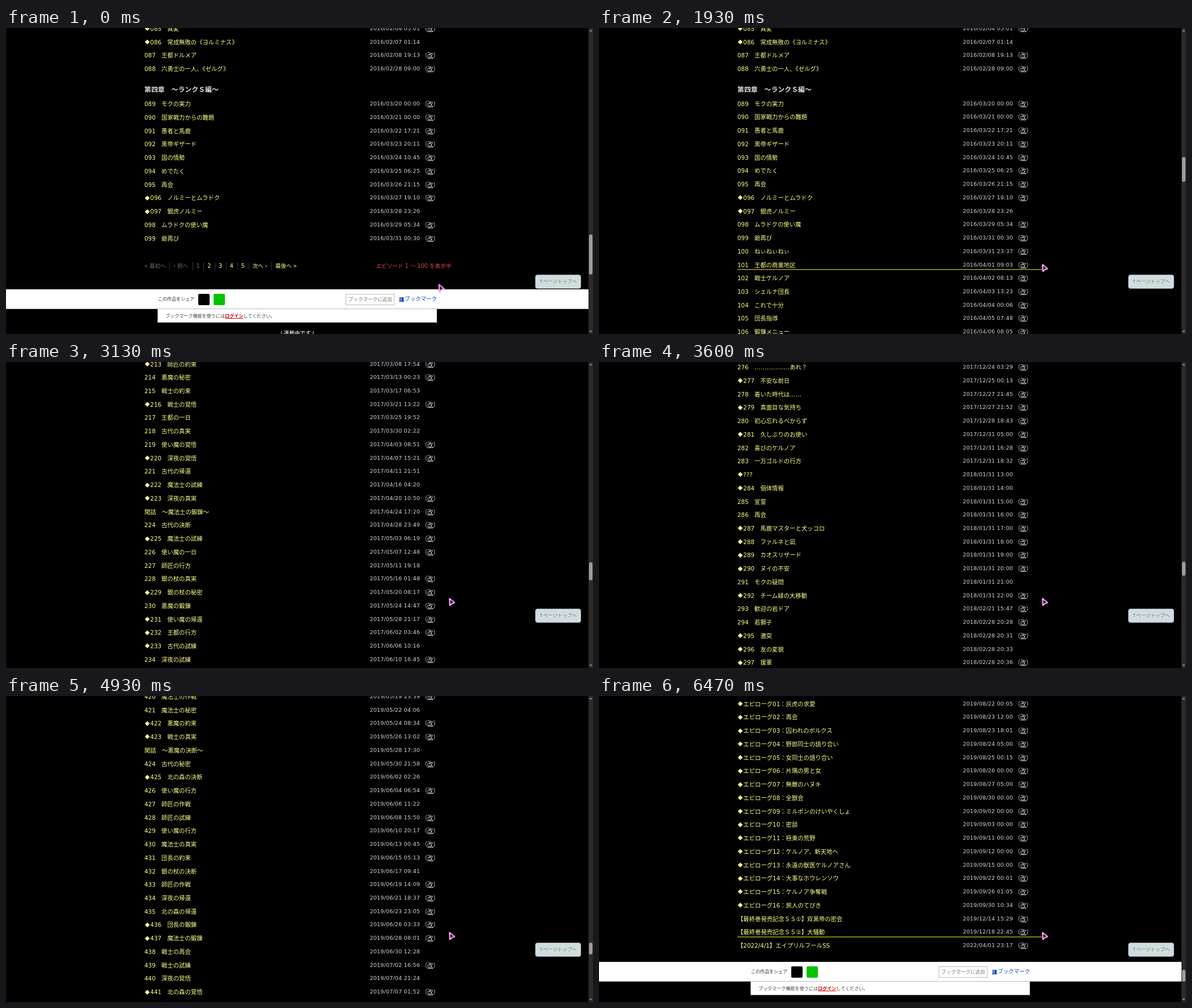
An HTML page for the animation above (7.27 s loop, 1035x541 px).

```html
<!DOCTYPE html>
<html lang="ja">
<head>
<meta charset="utf-8">
<title>Episode list</title>
<style>
html, body { margin: 0; width: 100%; height: 100%; overflow: hidden; background: #000; }
#stage { position: absolute; left: 0; top: 0; width: 1035px; height: 541px; overflow: hidden; background: #000;
  font-family: "DejaVu Sans", "Noto Sans CJK JP", "Noto Sans CJK", sans-serif; }
#stage div, #stage svg { position: absolute; box-sizing: border-box; }
.t { white-space: pre; line-height: 20px; }
.t i { display: inline-block; position: relative; top: -.07em; width: 1.176em; text-align: center;
  font: normal .85em/0 "Noto Sans CJK JP", "Noto Sans CJK", sans-serif; }
.ep { left: 244px; font-size: 10.35px; font-weight: 500; color: #ffff8c; }
.day { left: 641.5px; font-size: 9.5px; letter-spacing: .21px; color: #d8d8d8; }
.rev { left: 732.5px; font-size: 10.35px; color: #d8d8d8; }
.chap { left: 244px; font-size: 11.9px; font-weight: bold; color: #ddd; }
.first .late { display: none; }
#stage:not(.first) #pager { display: none; }
.sep { top: -7px; width: 1px; height: 14px; background: #333; }
#line { left: 244px; width: 539px; height: 2px; background: #7d7d1a; }
#foot { left: 0; width: 1027px; }
#strip { width: 1027px; height: 35px; background: #fff; border-bottom: 1px solid #bbb; }
#note { left: 267px; top: 35px; width: 493px; height: 24px; background: #fff; border: 1px solid #aaa; border-top: 0; }
.icon { top: 7.5px; width: 20px; height: 20px; border-radius: 2px; }
#add { left: 599px; top: 8px; width: 86px; height: 20px; border: 1.5px solid #bbb; }
.book { top: 14px; width: 2px; height: 7px; background: #0a43c8; }
#up { left: 933px; top: 436px; width: 81px; height: 25px; border: 1px solid #98a5a7; border-radius: 4px; background: #cfdddf; }
#bar { left: 1027px; top: 0; width: 8px; height: 541px; background: #2b2b2b; }
#thumb { left: 1px; width: 6px; border-radius: 3px; background: #9d9d9d; }
</style>
</head>
<body>
<div id="stage" class="first">
  <div id="head"></div>
  <div id="list"></div>
  <div id="pager"></div>
  <div id="foot">
    <div id="strip"></div><div id="note"></div>
    <div class="icon" style="left:339px;background:#000"></div>
    <div class="icon" style="left:366px;background:#00c300"></div>
    <div id="add"></div>
    <div class="book" style="left:693.5px"></div><div class="book" style="left:696.5px"></div>
    <div class="book" style="left:699px"></div>
    <div style="left:693px;top:21px;width:8.5px;height:1px;background:#0a43c8"></div>
  </div>
  <div id="line"></div>
  <div id="up"></div>
  <div id="bar">
    <svg width="8" height="541" fill="#999"><path d="M1.5 6 4 3 6.5 6zM1.5 535 4 538 6.5 535z"/></svg>
    <div id="thumb"></div>
  </div>
  <svg id="cursor" style="left:0;top:0" width="20" height="22" viewBox="-4 -4 20 22">
    <g stroke-linejoin="round">
      <path d="M1.2 1 9.6 8 5.4 9.2 1.9 12.6z" fill="none" stroke="#e23bd0" stroke-opacity=".7" stroke-width="3.4"/>
      <path d="M1.2 1 9.6 8 5.4 9.2 1.9 12.6z" fill="#2a0d2c" stroke="#fbc4f4" stroke-width="1.6"/>
    </g>
  </svg>
</div>
<script>
// "#" chapter, "=" no number, "~a b" filler up to number a with b side stories, trailing "-" not revised
const DATA = `◆異変|160204 0501
◆常成無敗の《ヨルミナス》|160207 0114-
王都ドルメア|160208 1913
六勇士の一人、《ゼルグ》|160228 0900
#第四章　～ランクＳ編～
モクの実力|160320 0000
国家戦力からの難題|160321 0000
愚者と馬鹿|160322 1721
黒帝ギザード|160323 2011
国の情勢|160324 1045
めでたく|160325 0625
再会|160326 2115
◆ノルミーとムラドク|160327 1910
◆銀虎ノルミー|160328 2326-
ムラドクの使い魔|160329 0534
爺再び|160331 0030
ねぃねぃねぃ|160331 2337
王都の商業地区|160401 0903
戦士ケルノア|160402 0813
シェルナ団長|160403 1323
これで十分|160404 0006
団長指導|160405 0748
鍛錬メニュー|160406 0805
~147 0
教えてダミロ先生！|160708 0400
ゼクリト少年|160709 0630
◆ただの魔法兵団|160710 1045
ねじりマント|160713 1539
古代の生徒、二人目|160721 0500
ありません！|160722 1003
ノキルの帰還|160723 1527
胎動|160724 0209
事件|160725 0131
魔法士対魔法士|160726 0000-
◆悪口、そして撤退|160731 0000
反省会|160801 0700
保守派と革新派改め|160802 0749
ガモロ・ネビリス|160803 0000
トルボの村|160804 2315
経験値考察|160806 1743
読心術|160807 0700
◇湯けむりスーハー！|160808 1735
◇ダミロ先生とマメさん|160809 0000
禁忌の修練|160810 1400
ライドオン|160811 2333
灼熱地獄|160812 2330
◆永遠の連携|160824 0711
~275 8
………………あれ？|171224 0329
◆不安な前日|171225 0013
着いた時代は……|171227 2145
◆真面目な気持ち|171227 2152
初心忘れるべからず|171228 1843
◆久しぶりのお使い|171231 0500
喜びのケルノア|171231 1628
一万ゴルドの行方|171231 1832
=◆???|180131 1300-
◆個体情報|180131 1400-
宣誓|180131 1500
再会|180131 1600
◆馬鹿マスターと犬ッコロ|180131 1700
◆ファルネと凪|180131 1800
◆カオスリザード|180131 1900
◆ヌイの不安|180131 2000
モクの疑問|180131 2100-
◆チーム緑の大移動|180131 2200
歓迎の岩ドア|180221 1547
若獅子|180228 2028
◆激突|180228 2031
◆友の変貌|180228 2033-
◆援軍|180228 2036
~379 4
前置き|190203 0200
ポルミーデの秘術|190203 0400
◆五年越しの質問|190203 0600-
サヌーカとの勝負|190203 0800
ノルミーとゾルネ|190203 1000-
忘却の彼方にあった成長|190203 1200
ケルノアの称号|190203 1400-
◆ガルードとケルノアの卒業試験|190203 1600
◆人類の頂|190203 1800
懐かしき再会|190204 2039
ムニポックの言伝|190205 0007
ゲルノの猪共|190206 1902
ダミロの足下を掘れ|190207 0000
ケルノアの足跡|190208 2046
想定外の復活|190209 1938-
ヴァルゼム|190211 0617
◆ゴズとの再会|190211 2200
再・迷宮へ|190213 2230
ヌヌとゲイズ|190226 0542-
お留守番|190406 1800-
人類と悪魔の戦力|190408 1727-
飛び交う？（はてな）|190409 1400
集結の時|190410 1517
~444 2
◆それぞれの夜　～後編～|190718 0012
#最終章　～永遠の旅人編（下）～
◆絆の咆哮|190720 0000
◆魔王軍の動向|190721 0000
◆モゼルとカドラ|190722 0022
◆トルゲンとミルファ|190725 0830
◆頂上決戦|190728 0000
◆奇襲|190801 0000
◆奇策|190802 1721
◆奇才|190802 2359
◆奇妙|190804 0000
◆奇縁|190805 0000
◆奇術|190806 0000
◆奇絶|190807 0000
◆奇禍|190808 0102
◆奇兵|190808 0951
◆奇怪|190809 0000-
◆奇譚|190810 0000
◆奇道|190811 0000
◆奇智|190812 0000
◆奇中|190813 0000
=閑話　～足跡と軌跡～|190814 0000
◆奇跡|190815 0500
◆奇遇|190817 0000
◆奇岩|190819 0000
=◆エピローグ01：灰虎の求愛|190822 0005
=◆エピローグ02：再会|190823 1200
=◆エピローグ03：囚われのボルクス|190823 1801
=◆エピローグ04：野郎同士の語り合い|190824 0500
=◆エピローグ05：女同士の語り合い|190825 0015
=◆エピローグ06：片隅の男と女|190826 0000
=◆エピローグ07：無敵のハヌキ|190827 0500
=◆エピローグ08：全獣会|190830 0000
=◆エピローグ09：ミルポンのけいやくしょ|190902 0000
=◆エピローグ10：密談|190903 0000
=◆エピローグ11：極東の荒野|190911 0000
=◆エピローグ12：ケルノア、新天地へ|190912 0000
=◆エピローグ13：永遠の獣医ケルノアさん|190915 0000
=◆エピローグ14：大事なホウレンソウ|190922 0001
=◆エピローグ15：ケルノア争奪戦|190926 0105
=◆エピローグ16：旅人のてびき|190930 1034
=【最終巻発売記念ＳＳ①】双黒帝の密会|191214 1529
=【最終巻発売記念ＳＳ②】大騒動|191218 2245
=【2022/4/1】エイプリルフールSS|220401 2317`.split('\n');

const $ = id => document.getElementById(id);
const stage = $('stage'), head = $('head'), list = $('list'), pager = $('pager'), foot = $('foot');
const ROW = 23.74;

function text(box, html, y, cls, css = '') {
  const d = document.createElement('div');
  d.className = 't ' + cls;
  d.style.cssText = css + `;top:${y - 10}px`;
  d.innerHTML = html.replace(/[◆◇]/, '<i>$&</i>');
  box.append(d);
}
const put = (box, html, x, y, size, color, more = '') =>
  text(box, html, y, '', `left:${x}px;font-size:${size}px;color:${color};${more}`);

let seed = 7;
const rnd = () => (seed = seed * 16807 % 2147483647) / 2147483647;
const pick = words => words[Math.floor(rnd() * words.length)];
const OWNERS = '魔法士 古代 戦士 迷宮 王都 使い魔 団長 悪魔 師匠 銀の杖 深夜 北の森'.split(' ');
const THINGS = '試練 帰還 秘密 決断 行方 鍛錬 再会 約束 作戦 一日 覚悟 真実'.split(' ');

const iso = line => line.split('|')[1].replace(/(..)(..)(..) (..)(..).*/, '20$1-$2-$3T$4:$5');
const stamp = line => Date.parse(iso(line) + 'Z');

const yOf = {};
let num = 85, y = 1;

function addRow(title, date, revised, numbered) {
  let label = title;
  if (numbered) {
    const mark = /^[◆◇]/.test(title) ? title[0] : '';
    label = `${mark}${String(num).padStart(3, '0')}　${title.slice(mark.length)}`;
    yOf[num] = y;
  } else if (title.includes('ローグ01')) yOf.epilogue = y;
  const box = num < 89 ? head : list, late = num > 99 ? ' late' : '';
  text(box, label, y, 'ep' + late);
  text(box, date.slice(0, 16).replace(/-/g, '/').replace('T', ' '), y, 'day' + late);
  if (revised) text(box, '（<u>改</u>）', y, 'rev' + late);
  if (numbered) num++;
  y += ROW;
}

function fill(last, extras, from, to) {
  const total = last - num + 1 + extras;
  for (let i = 0; i < total; i++) {
    const side = Math.floor((i + 1) * extras / total) > Math.floor(i * extras / total);
    const name = pick(OWNERS) + 'の' + pick(THINGS);
    const date = new Date(from + (to - from) * (i + 1) / (total + 1)).toISOString();
    addRow(side ? `閑話　～${name}～` : (rnd() < .3 ? '◆' : '') + name, date, rnd() < .8, !side);
  }
}

DATA.forEach((line, i) => {
  if (line[0] === '#') {
    y += 12.76;
    text(list, line.slice(1), y, 'chap' + (num > 99 ? ' late' : ''));
    y += 24.9;
  } else if (line[0] === '~') {
    const [last, extras] = line.slice(1).split(' ').map(Number);
    fill(last, extras, stamp(DATA[i - 1]), stamp(DATA[i + 1]));
  } else {
    const plain = line[0] === '=';
    addRow(line.split('|')[0].slice(plain ? 1 : 0), iso(line), !line.endsWith('-'), !plain);
  }
});
const footY = y - ROW + 29.2;

const GRAY = '#6e6e6e', LINK = '#ffff8c';
[['« 最初へ', 244, GRAY], ['‹ 前へ', 295, GRAY], ['1', 335.5, GRAY], ['2', 355.3, LINK], ['3', 375, LINK],
 ['4', 394.8, LINK], ['5', 414.8, LINK], ['次へ ›', 434.5, LINK], ['最後へ »', 475, LINK]]
  .forEach(([s, x, c]) => put(pager, s, x, 0, 9.6, c, 'font-weight:500'));
[288, 329, 348, 368, 388, 408, 428, 468].forEach(x => {
  const d = document.createElement('div');
  d.className = 'sep';
  d.style.left = x + 'px';
  pager.append(d);
});
put(pager, 'エピソード 1 ～ 100 を表示中', 652.5, 0, 9.6, '#e04848');

put(foot, 'この作品をシェア', 268, 17.7, 8.05, '#333');
put(foot, 'ブックマークに追加', 603.8, 17.5, 8.55, '#aaa', 'font-weight:bold');
put(foot, 'ブックマーク', 703, 17, 9.5, '#0a43c8');
put(foot, 'ブックマーク機能を使うには<b style="color:#d80000;text-decoration:underline">ログイン</b>してください。',
  281, 47, 8.08, '#444');
put(foot, '↓連載中です↓', 481.5, 77.5, 9.6, '#ccc', 'font-weight:bold');
put($('up'), '↑ページトップへ', 6, 11.2, 8.5, '#666', 'text-shadow:0 1px 1px #fff');

// scroll stops: [step, offset], 15 steps per second
const STOPS = [[33, 0], [40, yOf[148] - 8], [54, yOf[276] - 9.1], [66, yOf[380] - 13.3],
  [81, yOf[446] - 61.3], [89, yOf.epilogue - 13.7]];
const END = STOPS.length - 1;

function slope(i) {
  const a = STOPS[Math.max(i - 1, 0)], b = STOPS[Math.min(i + 1, END)];
  return (b[1] - a[1]) / (b[0] - a[0]);
}
function scrollAt(n) {
  if (n <= STOPS[0][0]) return 0;
  if (n >= STOPS[END][0]) return STOPS[END][1];
  const i = STOPS.findIndex(s => s[0] > n) - 1;
  const [n0, p0] = STOPS[i], [n1, p1] = STOPS[i + 1];
  const w = n1 - n0, t = (n - n0) / w, u = 1 - t;
  return p0 * u * u * (1 + 2 * t) + p1 * t * t * (3 - 2 * t) + w * t * u * (slope(i) * u - slope(i + 1) * t);
}

function pageHeight(n, pos) {
  if (n < 29) return 3960;
  return pos < 3900 ? 6430 : pos < 6400 ? 8842 : pos < 8800 ? 11318 : 13473;
}

const PATH = [[762.5, 453], [768, 443], [776, 428], [781, 417.5]];
let shown = -1;

function draw(n) {
  const s = scrollAt(n), nudge = n < 22 ? .6 : 0, first = n < 29;
  stage.classList.toggle('first', first);
  head.style.top = -s + 'px';
  list.style.top = nudge - s + 'px';
  pager.style.top = 420 + nudge + 'px';
  foot.style.top = (first ? 461.4 + nudge : footY - s) + 'px';

  const pos = 2692 + s, h = pageHeight(n, pos), thumb = $('thumb').style;
  thumb.top = 9 + 523 * pos / h + 'px';
  thumb.height = 523 * 541 / h + 'px';

  const line = $('line').style;
  line.display = (n >= 29 && n < 34) || n >= 97 ? 'block' : 'none';
  line.top = (n < 34 ? 426 : 425) + 'px';

  const [cx, cy] = PATH[Math.max(0, Math.min(n - 3, 3))];
  $('cursor').style.transform = `translate(${cx - 4}px,${cy - 4}px)`;
}

const start = performance.now();
function tick() {
  const t = (performance.now() - start) % 7270;
  const n = Math.floor((Math.floor(t / 10) + .5) * .15);
  if (n !== shown) draw(shown = n);
  requestAnimationFrame(tick);
}
tick();
</script>
</body>
</html>
```
